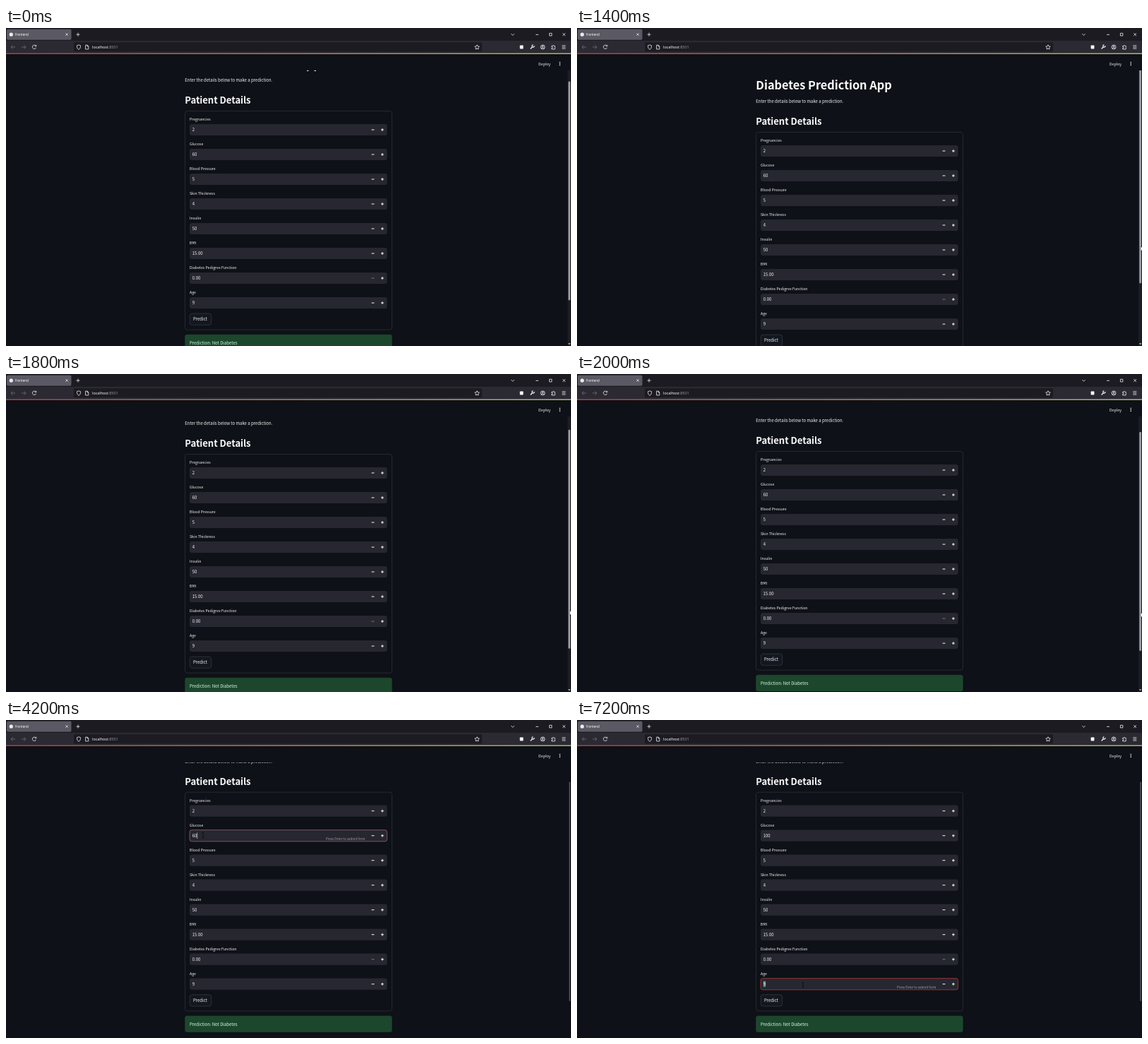
Animation of 800 by 450 pixels, one loop 8000 ms. Source, as an HTML page:

```html
<!DOCTYPE html>
<html lang="en">
<head>
<meta charset="utf-8">
<title>Diabetes Prediction App</title>
<style>
  html, body { margin: 0; width: 100%; height: 100%; overflow: hidden; background: #0e1117; }
  svg { display: block; }
  text { font-family: "Noto Sans CJK JP", "Noto Sans CJK SC", "Noto Sans CJK", "Open Sans", sans-serif; fill: #fafafa; }
  .ui text { font-family: "Noto Sans", "Open Sans", sans-serif; }
  .icon { fill: none; stroke: #fbfbfe; stroke-width: .75; }
</style>
</head>
<body>
<svg width="800" height="450" viewBox="0 0 800 450">
  <defs>
    <linearGradient id="stripe"><stop stop-color="#ff4b4b"/><stop offset="1" stop-color="#fffd80"/></linearGradient>
  </defs>
  <g id="page"></g>
  <g class="ui">
    <rect width="800" height="18" fill="#1c1b22"/>
    <rect x="1" y="1.7" width="91.5" height="15" rx="1.7" fill="#5a5964"/>
    <circle cx="7.3" cy="9.2" r="2.6" fill="#e9e9ee"/>
    <text x="13" y="10.9" font-size="4.6">frontend</text>
    <path class="icon" d="M84.5 7.5l3.2 3.2m0-3.2l-3.2 3.2M99.5 9.2h5m-2.5-2.5v5M715.3 8.2l2.2 2.2 2.2-2.2M750 9.4h4M769.4 7.4h3.4v3.6h-3.4zM788.2 7.3l3.8 3.8m0-3.8l-3.8 3.8"/>
    <rect y="18" width="800" height="18" fill="#2b2a33"/>
    <rect x="96" y="20.2" width="578" height="13.4" rx="1.7" fill="#1c1b22"/>
    <path class="icon" style="stroke:#75747d" d="M13.2 27H7.2m2.5-2.6L7.1 27l2.6 2.6M22 27h6m-2.5-2.6l2.6 2.6-2.6 2.6"/>
    <path class="icon" d="M42.2 25.2a2.7 2.7 0 1 0 .4 2.6M42.8 23.8v2h-2
      M103 23.9l2.5.9c.1 2.8-.5 4.5-2.5 5.7-2-1.2-2.6-2.9-2.5-5.7z
      M112.6 24.2h2.6l1.6 1.6v4.2h-4.2zM115 24.3v1.7h1.7
      M667 23.8l1 2.1 2.3.3-1.7 1.6.4 2.3-2-1.1-2 1.1.4-2.3-1.7-1.6 2.3-.3z
      M763 27a3 3 0 1 1-6 0a3 3 0 1 1 6 0M758.2 29a2 2 0 0 1 3.6 0M761 26.1a1 1 0 1 1-2 0a1 1 0 1 1 2 0
      M772.7 25.4h1.3a.9.9 0 1 1 1.8 0h1.4v4.6h-4.5v-1.6a.9.9 0 1 0 0-1.6z
      M787.3 24.9h5m-5 2.1h5m-5 2.1h5"/>
    <path class="icon" style="stroke-width:1.2" d="M742.6 29.5l3-3M748 25.2a1.6 1.6 0 1 1-1.7-1.3"/>
    <rect x="727.6" y="24.6" width="4.8" height="4.8" rx=".6" fill="#fbfbfe"/>
    <text x="122" y="29" font-size="5.4">localhost<tspan fill="#96959e">:8501</tspan></text>
  </g>
  <rect y="35.7" width="800" height="1" fill="url(#stripe)"/>
  <g id="pointer"></g>
</svg>
<script>
const LOOP = 8000, RED = '#ff4b4b';
const labels = ['Pregnancies', 'Glucose', 'Blood Pressure', 'Skin Thickness', 'Insulin', 'BMI', 'Diabetes Pedigree Function', 'Age'];
const initial = ['2', '60', '5', '4', '50', '15.00', '0.00', '9'];
const GLUCOSE = 1, AGE = 7, REST = 45.3;

// Each step changes part of the state, from its time in ms onwards.
const steps = [
  [0, { scroll: 30, dragging: true, glucose: '60', focus: -1 }],
  [200, { scroll: -12, pointer: 'arrow' }],
  [1400, { scroll: 0 }],
  [1600, { scroll: 12 }],
  [1800, { scroll: 34 }],
  [2000, { scroll: 38 }],
  [2200, { scroll: 44.6 }],
  [2600, { scroll: REST }],
  [4200, { dragging: false, focus: GLUCOSE, ring: '#e0868a', hint: true, caret: true, pointer: 'beam', x: 279, y: 163 }],
  [4400, { ring: RED, caret: false }],
  [5000, { selected: true }],
  [5200, { selected: false, caret: true, glucose: '1', pointer: '' }],
  [5400, { glucose: '10' }],
  [5600, { glucose: '100' }],
  [6200, { caret: false }],
  [6400, { caret: true, hover: true, pointer: 'arrow', x: 258.7, y: 424 }],
  [6800, { hover: false, x: 266.5, y: 433 }],
  [7000, { hint: false, caret: false, pointer: 'beam', x: 320, y: 375 }],
  [7200, { focus: AGE, hint: true, selected: true }],
];

const text = (x, y, size, content, extra = '') => `<text x="${x}" y="${y}" font-size="${size}" ${extra}>${content}</text>`;
const box = (x, y, w, h, r, fill, stroke = 'none') =>
  `<rect x="${x}" y="${y}" width="${w}" height="${h}" rx="${r}" fill="${fill}" stroke="${stroke}" stroke-width=".5"/>`;

function field(i, s) {
  const y = 174 + 35 * i, focused = i === s.focus;
  const value = i === GLUCOSE ? s.glucose : initial[i];
  const end = 3.31 * value.length;
  return text(260, y - 13, 5.22, labels[i])
    + box(260, y - 8.1, 279.6, 16.2, 3, '#262730', focused ? s.ring : 'none')
    + (focused && s.selected ? box(263.7, y - 4.3, end + .2, 8.4, 0, '#667a80') : '')
    + text(263.7, y + 2.3, 5.97, value)
    + (focused && s.caret ? box(263.9 + end, y - 4.2, .6, 8.4, 0, '#fafafa') : '')
    + (focused && s.hint ? text(453, y + 6.4, 4.48, 'Press Enter to submit form', 'style="fill:#a3a3a7"') : '')
    + `<path d="M517.6 ${y}h3.8" stroke="${i === 6 ? '#77787e' : '#fafafa'}"/>`
    + `<path d="M531 ${y}h3.8m-1.9-1.9v3.8" stroke="#fafafa"/>`;
}

function scrollbar(s) {
  const top = 51.5 + .8 * s.scroll;
  return s.dragging
    ? box(795, 37, 5, 413, 0, '#1b1d23') + box(796.2, top, 2.8, 310, 1.4, '#9c9ca1')
      + '<path d="M795.9 446h3.4l-1.7 2.2z" fill="#b5b5ba"/>'
    : box(797.4, top, 1.3, 310, .6, '#63646a');
}

function page(s) {
  const faint = '#3d4045', ink = s.hover ? RED : '#fafafa';
  return `<g transform="translate(0 ${-s.scroll})">`
    + text(253.3, 87, 16.4, 'Diabetes Prediction App', 'font-weight="700" letter-spacing="-.05"')
    + text(253.3, 106.2, 5.97, 'Enter the details below to make a prediction.')
    + text(253.3, 136.9, 13.1, 'Patient Details', 'font-weight="600" letter-spacing="-.05"')
    + box(253.5, 147.5, 293, 309.6, 3.3, 'none', faint)
    + labels.map((_, i) => field(i, s)).join('')
    + box(260.3, 434, 30.4, 16.3, 3.3, '#131720', s.hover ? RED : '#4a4c52')
    + text(265, 444.4, 5.97, 'Predict', `style="fill:${ink}"`)
    + box(253.3, 463.8, 293.3, 23.2, 3.3, '#1c472c')
    + text(260, 478, 5.97, 'Prediction: Not Diabetes', 'style="fill:#dffde9"')
    + '</g>' + scrollbar(s)
    + box(0, 36, 800, 24, 0, '#0e1117')
    + text(754, 52.5, 5.22, 'Deploy')
    + [48.4, 50.5, 52.6].map(y => `<circle cx="784.2" cy="${y}" r=".75" fill="#fafafa"/>`).join('');
}

function pointer(s) {
  const x = s.dragging ? 798.2 : s.x, y = s.dragging ? 308.8 + .75 * s.scroll : s.y;
  const shapes = {
    arrow: '<path d="M0 0V7.2L1.7 5.7 2.9 8.4 4 7.9 2.9 5.3H5.1Z" fill="#fff" stroke="#000" stroke-width=".3"/>',
    beam: '<path d="M-1.2-3.6H1.2M0-3.6V3.6M-1.2 3.6H1.2" stroke="#07080b" stroke-width=".7"/>',
  };
  return s.pointer ? `<g transform="translate(${x} ${y})">${shapes[s.pointer]}</g>` : '';
}

const pageLayer = document.getElementById('page'), pointerLayer = document.getElementById('pointer');
let shown = 0;
function draw() {
  const t = performance.now() % LOOP;
  const past = steps.filter(([start]) => start <= t);
  if (past.length !== shown) {
    shown = past.length;
    const state = Object.assign({}, ...past.map(([, change]) => change));
    pageLayer.innerHTML = page(state);
    pointerLayer.innerHTML = pointer(state);
  }
  requestAnimationFrame(draw);
}
draw();
</script>
</body>
</html>
```
